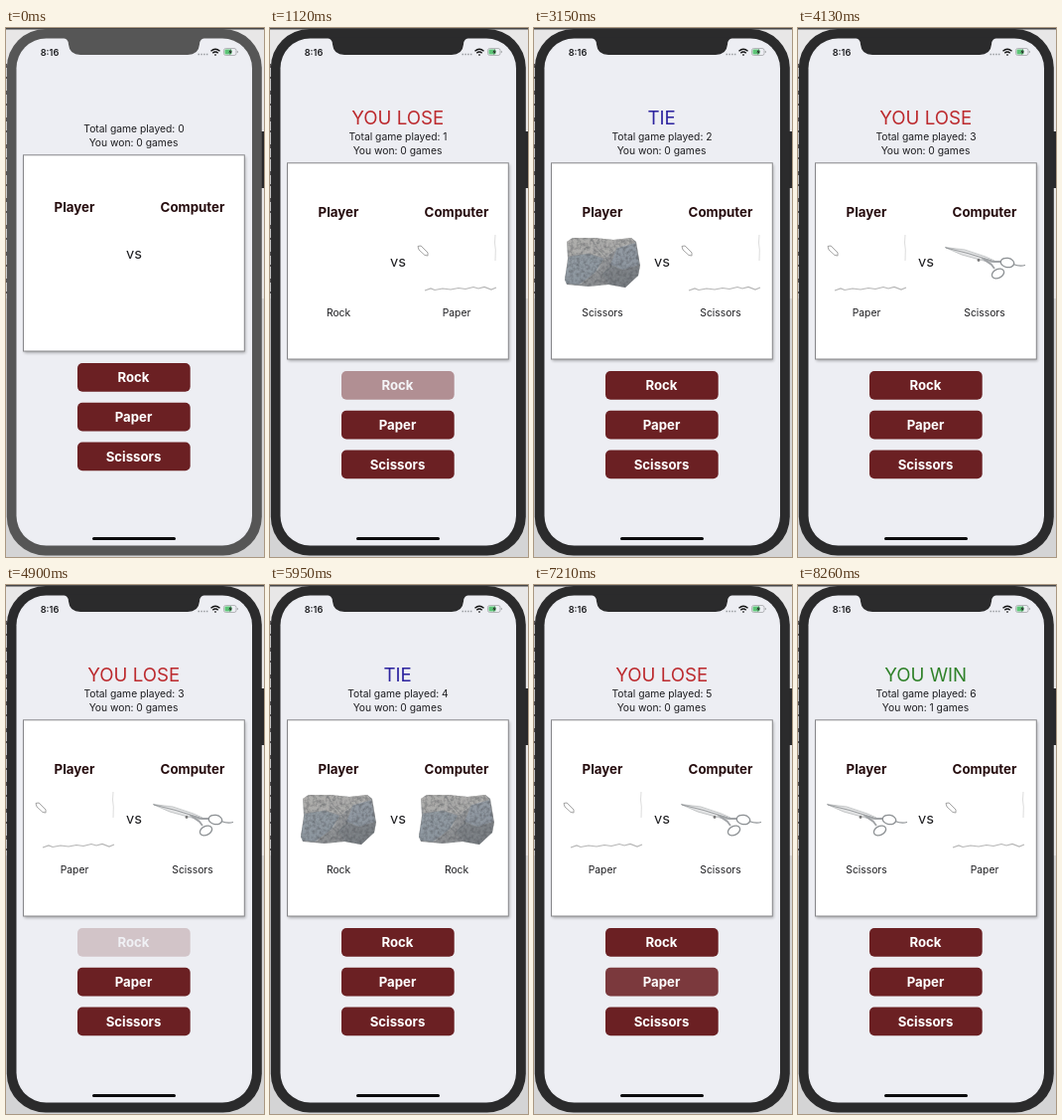
Animation of 260 by 532 pixels, one loop 8330 ms. Source, as an HTML page:

```html
<!DOCTYPE html>
<html lang="en">
<head>
<meta charset="utf-8">
<title>Rock Paper Scissors</title>
<style>
  html, body { margin: 0; width: 100%; height: 100%; overflow: hidden; }
  svg { display: block; width: 260px; height: 532px; }
  text { font: 10.3px Inter, "Open Sans", sans-serif; fill: #1d1d20; text-anchor: middle; }
  .bold { font-size: 13.3px; font-weight: 700; fill: #260c0e; }
  .button text { font-size: 13.2px; fill: #fff; }
  #result { font-size: 18.7px; }
  #versus { font-size: 14.7px; }
  #clock { font-size: 9.2px; font-weight: 600; }
</style>
</head>
<body>
<svg viewBox="0 0 260 532">
  <defs>
    <linearGradient id="stone" x2=".7" y2="1">
      <stop stop-color="#a2a3a2"/><stop offset=".5" stop-color="#97999b"/><stop offset="1" stop-color="#85888b"/>
    </linearGradient>
    <filter id="grain" color-interpolation-filters="sRGB">
      <feTurbulence type="fractalNoise" baseFrequency=".3" numOctaves="3" seed="4"/>
      <feColorMatrix values="0 0 0 0 .3  0 0 0 0 .31  0 0 0 0 .33  1.1 0 0 0 -.42"/>
      <feComposite in2="SourceGraphic" operator="in" result="specks"/>
      <feMerge><feMergeNode in="SourceGraphic"/><feMergeNode in="specks"/></feMerge>
    </filter>
    <filter id="soft" x="-10%" y="-10%" width="120%" height="120%"><feGaussianBlur stdDeviation="1.7"/></filter>

    <g id="None"/>
    <g id="Rock" filter="url(#grain)">
      <path fill="url(#stone)" d="M33 215 39 211 60 211 80 213 98 211 103 215 107 239 105 249 92 261 75 258 55 260 33 258 31 253 34 232Z"/>
      <path fill="#b4b3af" opacity=".7" d="M39 211 60 211 80 213 98 211 102 216 84 221 72 231 55 226 36 229 33 215Z"/>
      <path fill="#8598ab" opacity=".4" d="M35 230 55 227 70 232 62 246 46 258 33 257 31 253Z"/>
      <path fill="#8d9bab" opacity=".5" d="M84 221 102 216 106 238 90 243 77 238Z"/>
      <path fill="#6d737b" opacity=".45" d="M77 239 90 243 106 239 105 249 92 261 76 258 69 247Z"/>
      <path fill="none" stroke="#c3c2bf" stroke-width=".8" opacity=".6" d="M36 229 55 226 72 231 84 221 102 216M72 231 62 246 46 258"/>
      <path fill="none" stroke="#5b626a" stroke-width=".6" opacity=".5" d="M72 231 78 240 69 248 75 258M58 212 64 222 72 230"/>
    </g>
    <g id="Paper" fill="none" stroke="#b6b6b6" stroke-width=".9">
      <path d="M30 219.500 33 219 40 226 40 229 37 228.500 31 223Z" stroke="#999"/>
      <path d="M108 208 107.500 216 108.300 223 108 234" stroke="#d8d8d8"/>
      <path d="M37 264 43 262 47 263.500 55 262 63 263 71 261.500 78 262.500 86 260.500 91 262 97 260.500 104 263 109 261" stroke-width="1.200"/>
    </g>
    <g id="Scissors" fill="none" stroke="#8c9093" stroke-width="1.300">
      <path d="M29 220.500 49 223 70 230 79 234 76 236 66 233.500 46 228Z" fill="#e4e5e6" stroke="#a3a6a8" stroke-width=".6"/>
      <path d="M30 221 52 226.500 76 234" stroke="#777b7e" stroke-width=".7"/>
      <path d="M66 231.500 78 235 86 235M68 232.500 76 238 79 242" stroke="#a0a3a6" stroke-width="1.800"/>
      <ellipse cx="92" cy="236" rx="6.800" ry="4.600" transform="rotate(10 92 236)"/>
      <ellipse cx="82.500" cy="247" rx="6.500" ry="4.400" transform="rotate(-28 82.500 247)"/>
      <path d="M98 237.500Q104 240 110 238.500" stroke-width="1.200"/>
      <circle cx="63" cy="233.500" r="1.400" fill="#777" stroke="none"/>
    </g>
  </defs>

  <rect width="260" height="532" fill="#d4d4d5"/>
  <rect width="260" height="272" fill="#e8e7e7"/>
  <rect width="260" height="1.500" fill="#454547"/>
  <path d="M.5 36v240" stroke="#5c585a" stroke-dasharray="4 9 2 12"/>
  <rect x="256" y="104" width="4" height="57" fill="#29292b"/>

  <g id="bezel">
    <rect x=".8" y="1" width="257" height="529.500" rx="39"/>
    <rect x="10.500" y="10.500" width="237.500" height="510" rx="30" fill="#edeef3"/>
    <path d="M56 9.500H202Q195 10.500 195 16.500Q194 27 183 27H75Q64 27 63 16.500Q63 10.500 56 9.500Z"/>
  </g>

  <text id="clock" x="44" y="27.500">8:16</text>
  <path d="M193.500 26.500h10" stroke="#999ca1" stroke-width="1.500" stroke-dasharray="1.500 1.300"/>
  <g fill="none" stroke="#111" stroke-width="1.400">
    <path d="M206.500 23.300Q211 19.300 215.500 23.300M208.300 25.300Q211 22.900 213.700 25.300"/>
    <circle cx="211" cy="27" r=".6" fill="#111" stroke-width=".5"/>
  </g>
  <rect x="219.500" y="20.500" width="12.500" height="7" rx="2" fill="none" stroke="#a5a8aa" stroke-width=".8"/>
  <rect x="220.500" y="21.500" width="7" height="5" rx="1" fill="#5dc577"/>
  <path d="M226.800 21 224.300 24.500H226L225.200 27 228 23.500H226.200Z" fill="#222"/>
  <path d="M233.300 23v2" stroke="#a5a8aa"/>

  <text id="result" x="128.700" y="97"></text>
  <g id="content">
    <text id="played" x="129" y="105"></text>
    <text id="won" x="128.500" y="119"></text>
    <rect x="18.500" y="129.500" width="223" height="197.500" fill="#000" opacity=".27" filter="url(#soft)"/>
    <rect x="17.500" y="127.800" width="222.800" height="197.200" fill="#fff" stroke="#87878a"/>
    <text id="versus" x="129" y="232.300">vs</text>
  </g>
  <g id="titles">
    <text class="bold" x="69" y="185">Player</text>
    <text class="bold" x="188" y="185">Computer</text>
  </g>
  <use id="playerImage"/>
  <use id="computerImage" x="119"/>
  <text id="playerPick" x="69" y="290"></text>
  <text id="computerPick" x="188" y="290"></text>
  <g id="buttons"></g>

  <rect x="87" y="512" width="84" height="3" rx="1.500" fill="#0b0b0c"/>
</svg>
<script>
const LOOP = 8330, STEP = 70, ACTIVATED = 630;
const NAMES = ['Rock', 'Paper', 'Scissors'];
const COLORS = { 'YOU LOSE': '#bc2a2e', 'TIE': '#2d249f', 'YOU WIN': '#2f8129' };

const round = (press, release, playerLoad, computerLoad, player, computer, result) =>
  ({ press, release, playerLoad, computerLoad, player, computer, result });
const rounds = [
  round(700, 1020, 1330, 1050, 'Rock', 'Paper', 'YOU LOSE'),
  round(2730, 2870, 3220, 3220, 'Scissors', 'Scissors', 'TIE'),
  round(3570, 3850, 4060, 4060, 'Paper', 'Scissors', 'YOU LOSE'),
  round(4620, 4970, 5180, 5180, 'Rock', 'Rock', 'TIE'),
  round(6650, 7030, 7140, 7140, 'Paper', 'Scissors', 'YOU LOSE'),
  round(7560, 7840, 7980, 7980, 'Scissors', 'Paper', 'YOU WIN'),
];

const $ = id => document.getElementById(id);
const setText = (id, value) => { $(id).textContent = value; };
const shift = (id, y) => $(id).setAttribute('transform', `translate(0 ${y})`);

$('buttons').innerHTML = NAMES.map((name, i) => `
  <g class="button" id="button${name}">
    <rect x="72" y="${337 + 39.8 * i}" width="113.700" height="28.700" rx="5" fill="#6b2023"/>
    <text class="bold" x="128.500" y="${356.3 + 39.8 * i}">${name}</text>
  </g>`).join('');

function ease(p) {
  p = Math.max(0, Math.min(1, p));
  return p < .5 ? 2 * p * p : 1 - 2 * (1 - p) ** 2;
}

function buttonOpacity(name, t) {
  const r = rounds.findLast(r => r.player === name && t >= r.press);
  if (!r) return 1;
  const pressed = 1 - .8 * ease((Math.min(t, r.release) - r.press) / 150);
  return pressed + (1 - pressed) * ease((t - r.release) / 250);
}

function showImage(side, t) {
  const r = rounds.findLast(r => t >= r[side + 'Load']);
  $(side + 'Image').setAttribute('href', '#' + (r ? r[side] : 'None'));
}

function render(t) {
  const done = rounds.filter(r => t >= r.release);
  const last = done.at(-1) || { player: '', computer: '', result: '' };
  const wins = done.filter(r => r.result === 'YOU WIN').length;

  $('bezel').setAttribute('fill', t < ACTIVATED ? '#565656' : '#2b2b2c');
  setText('result', last.result);
  $('result').style.fill = COLORS[last.result] || 'none';
  setText('played', `Total game played: ${done.length}`);
  setText('won', `You won: ${wins} games`);
  setText('playerPick', last.player);
  setText('computerPick', last.computer);

  const drop = done.length ? 8 : 0;
  shift('content', drop);
  shift('buttons', drop);
  shift('titles', done.length ? 5 : 0);

  showImage('player', t);
  showImage('computer', t);
  for (const name of NAMES) $('button' + name).setAttribute('opacity', buttonOpacity(name, t));
}

const start = performance.now();
function tick() {
  const t = (performance.now() - start) % LOOP;
  render(Math.floor(t / STEP) * STEP);
  requestAnimationFrame(tick);
}
tick();
</script>
</body>
</html>
```
